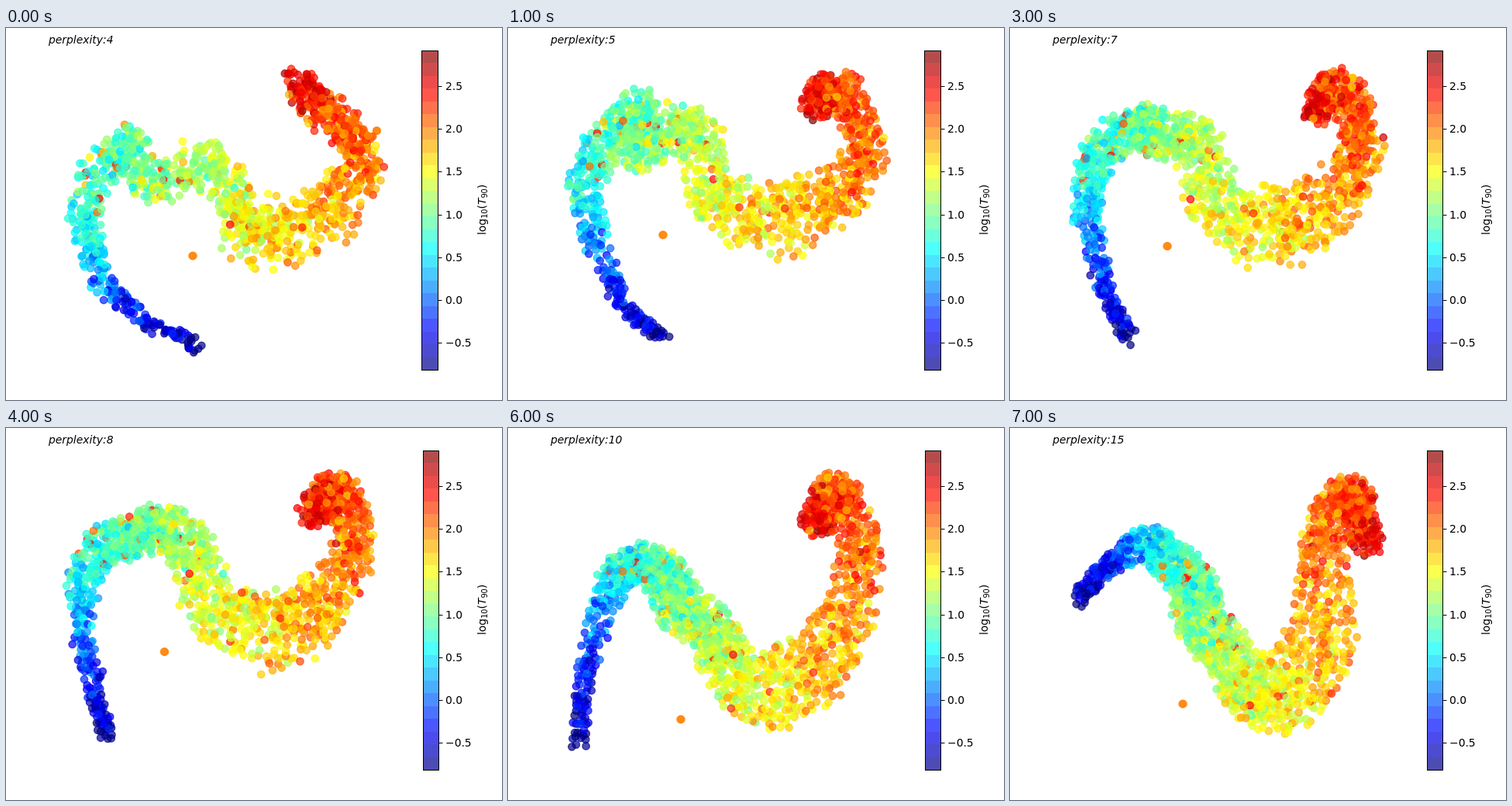
Animation of 640 by 480 pixels, one loop 8000 ms. Source, as an HTML page with a canvas:

```html
<!DOCTYPE html>
<html lang="en">
<head>
<meta charset="utf-8">
<title>Perplexity sweep</title>
<style>
html, body { margin: 0; width: 100%; height: 100%; overflow: hidden; background: #fff; }
canvas { display: block; }
</style>
</head>
<body>
<canvas id="stage" width="640" height="480"></canvas>
<script>
const ctx = document.getElementById('stage').getContext('2d');
const FONT = '13.89px "DejaVu Sans", sans-serif';
const SMALL = '9.72px "DejaVu Sans", sans-serif';
const ALPHA = 0.7;
const V_MIN = -0.815, V_MAX = 2.917;
const BAR = { top: 29, height: 412, bands: 25 };
const DOTS = 1300;

// The cloud is a band of dots along a curve, from the short blue end to the long red end.
const VALUES = [-0.72, -0.35, 0.4, 0.75, 0.93, 1.1, 1.27, 1.4, 1.65, 1.85, 2.07, 2.2, 2.62];
const RADII = [12, 14, 24, 30, 32, 36, 37, 42, 58, 48, 32, 30, 24];

// Key points of the curve; perplexities in between are interpolated.
const poses = [
  { perplexity: 4, stray: [241, 294],
    x: [250, 168, 106, 105, 155, 185, 260, 300, 345, 425, 455, 415, 373],
    y: [410, 370, 296, 215, 150, 200, 175, 250, 260, 235, 155, 110, 68] },
  { perplexity: 5, stray: [200, 267],
    x: [198, 145, 102, 112, 168, 165, 235, 265, 330, 400, 460, 430, 393],
    y: [396, 350, 240, 168, 105, 155, 125, 215, 245, 230, 160, 82, 100] },
  { perplexity: 9, stray: [206, 296],
    x: [109, 102, 97, 125, 160, 205, 240, 270, 335, 395, 447, 427, 398],
    y: [402, 325, 215, 150, 155, 120, 165, 240, 268, 240, 150, 82, 112] },
  { perplexity: 10, stray: [223, 376],
    x: [92, 101, 131, 168, 205, 222, 265, 295, 350, 412, 453, 425, 398],
    y: [408, 320, 207, 175, 195, 230, 262, 320, 335, 285, 175, 85, 125] },
  { perplexity: 15, stray: [223, 356],
    x: [86, 122, 172, 205, 238, 245, 275, 310, 347, 405, 405, 437, 460],
    y: [221, 183, 150, 170, 205, 245, 285, 335, 340, 270, 150, 88, 145] }
];

const mix = (a, b, t) => a + (b - a) * t;
const mixAll = (a, b, t) => a.map((n, i) => mix(n, b[i], t));

function randomFrom(seed) {
  return () => {
    seed = (seed + 0x6D2B79F5) | 0;
    let t = Math.imul(seed ^ (seed >>> 15), 1 | seed);
    t = (t + Math.imul(t ^ (t >>> 7), 61 | t)) ^ t;
    return ((t ^ (t >>> 14)) >>> 0) / 4294967296;
  };
}

// Catmull-Rom curve through evenly spaced keys, u from 0 to 1.
function spline(keys, u) {
  const last = keys.length - 1;
  const i = Math.min(last - 1, Math.floor(u * last));
  const t = u * last - i;
  const a = keys[Math.max(0, i - 1)], b = keys[i];
  const c = keys[i + 1], d = keys[Math.min(last, i + 2)];
  return b + t / 2 * (c - a + t * (2 * a - 5 * b + 4 * c - d + t * (3 * (b - c) + d - a)));
}

function jet(value) {
  const t = Math.min(1, Math.max(0, (value - V_MIN) / (V_MAX - V_MIN)));
  const channel = c => Math.round(255 * Math.min(1, Math.max(0, 1.5 - Math.abs(4 * t - c))));
  return `rgb(${channel(3)},${channel(2)},${channel(1)})`;
}

function poseAt(perplexity) {
  const next = Math.max(1, poses.findIndex(pose => pose.perplexity >= perplexity));
  const a = poses[next - 1], b = poses[next];
  const t = (perplexity - a.perplexity) / (b.perplexity - a.perplexity);
  return { x: mixAll(a.x, b.x, t), y: mixAll(a.y, b.y, t), stray: mixAll(a.stray, b.stray, t) };
}

// Dots keep their place along the curve, colour and stacking order throughout.
const memberRandom = randomFrom(7);
const members = Array.from({ length: DOTS }, (_, i) => {
  const u = ((i + 0.5) / DOTS) ** 0.8;
  const base = spline(VALUES, u);
  const bell = memberRandom() + memberRandom() + memberRandom() - 1.5;
  const outlier = base > 0.6 && memberRandom() < 0.06;
  const value = outlier ? mix(1.5, 2.45, memberRandom()) : base + 0.42 * bell;
  return { u, color: jet(value), order: memberRandom() };
});

// Low perplexity gathers neighbours into clumps, high perplexity spaces them evenly.
function layOut(perplexity) {
  const random = randomFrom(perplexity * 101);
  const pose = poseAt(perplexity);
  const pull = 2 / perplexity;
  const tries = Math.ceil(perplexity / 4);
  const dots = [];
  let leader;

  function candidate(u, follows) {
    const angle = random() * 2 * Math.PI;
    const reach = spline(RADII, u) * random() ** 0.55;
    const x = spline(pose.x, u) + reach * Math.cos(angle);
    const y = spline(pose.y, u) + reach * Math.sin(angle);
    const t = follows ? pull * random() : 0;
    return { x: mix(x, follows ? leader.x : x, t), y: mix(y, follows ? leader.y : y, t) };
  }

  members.forEach(({ u, color, order }, i) => {
    const follows = i % 12 > 0;
    let best, bestGap = -1;
    for (let n = 0; n < tries; n++) {
      const spot = candidate(u, follows);
      let gap = Infinity;
      for (const dot of dots) gap = Math.min(gap, (dot.x - spot.x) ** 2 + (dot.y - spot.y) ** 2);
      if (gap > bestGap) {
        bestGap = gap;
        best = spot;
      }
    }
    if (!follows) leader = best;
    dots.push({ ...best, color, order });
  });

  const [x, y] = pose.stray;
  for (const shift of [-0.5, 0.5]) dots.push({ x: x + shift, y, color: jet(1.98), order: 1 });
  return dots.sort((a, b) => a.order - b.order);
}

function drawDots(dots) {
  ctx.globalAlpha = ALPHA;
  ctx.lineWidth = 1.39;
  for (const { x, y, color } of dots) {
    ctx.fillStyle = ctx.strokeStyle = color;
    ctx.beginPath();
    ctx.arc(x, y, 4.7, 0, 2 * Math.PI);
    ctx.fill();
    ctx.stroke();
  }
  ctx.globalAlpha = 1;
}

function drawAxisLabel() {
  const parts = [['log', FONT, 0], ['10', SMALL, 2.3], ['(', FONT, 0],
    ['T', 'italic ' + FONT, 0], ['90', SMALL, 2.3], [')', FONT, 0]];
  ctx.save();
  ctx.translate(619, 267);
  ctx.rotate(-Math.PI / 2);
  let x = 0;
  for (const [text, font, drop] of parts) {
    ctx.font = font;
    ctx.fillText(text, x, drop);
    x += ctx.measureText(text).width;
  }
  ctx.restore();
}

function drawBar(left, right) {
  const { top, height, bands } = BAR;
  const edge = i => Math.round(top + i * height / bands);
  ctx.globalAlpha = ALPHA;
  for (let i = 0; i < bands; i++) {
    ctx.fillStyle = jet(mix(V_MAX, V_MIN, (i + 0.5) / bands));
    ctx.fillRect(left, edge(i), right - left, edge(i + 1) - edge(i));
  }
  ctx.globalAlpha = 1;
  ctx.strokeStyle = ctx.fillStyle = '#000';
  ctx.lineWidth = 1;
  ctx.strokeRect(left, top + 0.5, right - left, height);
  ctx.font = FONT;
  for (let v = -0.5; v <= 2.5; v += 0.5) {
    const y = Math.round(top + (V_MAX - v) / (V_MAX - V_MIN) * height);
    ctx.beginPath();
    ctx.moveTo(right, y + 0.5);
    ctx.lineTo(right + 5, y + 0.5);
    ctx.stroke();
    ctx.fillText(v.toFixed(1).replace('-', '\u2212'), 567, y + 5);
  }
  drawAxisLabel();
}

function drawScene({ perplexity, dots }) {
  ctx.fillStyle = '#fff';
  ctx.fillRect(0, 0, 640, 480);
  drawDots(dots);
  const left = Math.min(538.5, 532.5 + perplexity);
  drawBar(left, Math.min(558.5, left + 21));
  ctx.font = 'italic ' + FONT;
  ctx.fillText('perplexity:' + perplexity, 55, 20);
}

const scenes = [4, 5, 6, 7, 8, 9, 10, 15].map(perplexity => ({ perplexity, dots: layOut(perplexity) }));

const start = performance.now();
let shown = -1;
function tick() {
  const index = Math.floor((performance.now() - start) / 1000) % scenes.length;
  if (index !== shown) drawScene(scenes[shown = index]);
  requestAnimationFrame(tick);
}
tick();
</script>
</body>
</html>
```
